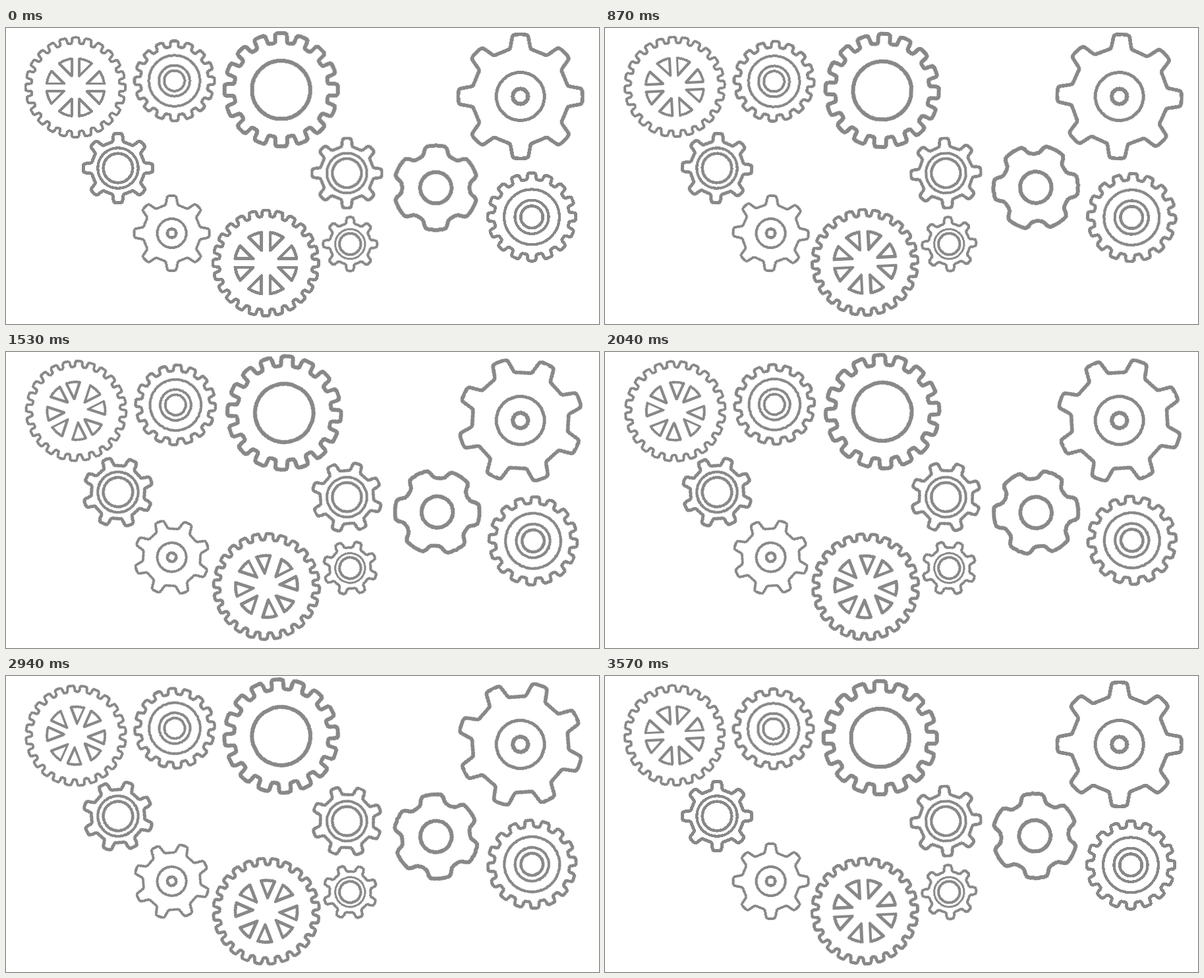
Write an HTML page that moves like this. It is 900 px wide and 450 px high and loops after 3.6 s.

```html
<!DOCTYPE html>
<html lang="en">
<head>
<meta charset="utf-8">
<title>Turning gears</title>
<style>
  html, body { margin: 0; width: 100%; height: 100%; overflow: hidden; background: #fff; }
  svg { display: block; width: 900px; height: 450px; }
  svg * { fill: none; stroke: #888; stroke-linejoin: round; shape-rendering: crispEdges; }
  .cw, .ccw { transform-origin: 0 0; animation: cw 3600ms linear infinite; }
  .ccw { animation-name: ccw; }
  @keyframes cw { to { transform: rotate(360deg); } }
  @keyframes ccw {
    0% { transform: rotate(0deg); }
    99.1667%, 100% { transform: rotate(-360deg); }
  }
</style>
</head>
<body>
<svg id="stage" viewBox="0 0 900 450"></svg>
<script>
const NS = 'http://www.w3.org/2000/svg';
const RAD = Math.PI / 180;

// x, y: pivot; off: centre relative to the pivot
// R, root: tooth tip and valley radius; top, base: half angles of a tooth
// round: corner radius at [tip, valley]; rings: [radius, width]
// wedge: [radius, half gap on the axes, half gap on the diagonals]
const gears = [
  { x: 106.1, y: 90, off: [-.6, .3], dir: 'cw', n: 24, R: 75.9, root: 66.8, top: 3.9, base: 5, round: [3.4, 2.4], w: 3.9, wedge: [44, 5.8, 8.2] },
  { x: 256.5, y: 80.2, off: [-.9, .1], dir: 'ccw', n: 16, R: 60.8, root: 51.8, top: 5.2, base: 6.9, round: [3.4, 2.4], w: 4.4, rings: [[38.8, 4], [23.5, 4], [15.6, 4]] },
  { x: 419.7, y: 92.8, off: [-2.2, 1.2], dir: 'ccw', n: 16, R: 86.4, root: 71.8, top: 5.9, base: 7.1, round: [4.5, 3], w: 6, rings: [[44.3, 6]] },
  { x: 170, y: 213, dir: 'ccw', n: 8, R: 52.9, root: 41, top: 7.2, base: 11.2, round: [4, 2.5], w: 5, rings: [[30.7, 4.3], [22.3, 4.6]] },
  { x: 251.6, y: 312, dir: 'ccw', n: 8, R: 57, root: 44, top: 6.6, base: 12.2, round: [3, 1.5], w: 3.8, rings: [[22, 4], [6.7, 4.5]] },
  { x: 395, y: 357, off: [-.6, .3], dir: 'cw', n: 24, R: 80.4, root: 70.8, top: 3.9, base: 5, round: [3.7, 2.5], w: 4.8, wedge: [47, 6.6, 9] },
  { x: 517.4, y: 220.6, dir: 'cw', n: 8, R: 53.1, root: 41, top: 7.2, base: 11.2, round: [4, 2.5], w: 4.7, rings: [[30.4, 4], [22.1, 4.4]] },
  { x: 522.3, y: 328.4, dir: 'cw', n: 8, R: 40.8, root: 31.7, top: 7.2, base: 11.2, round: [3, 2], w: 4, rings: [[22.6, 3], [16.2, 4]] },
  { x: 653.4, y: 243.3, off: [-1, -.4], dir: 'cw', n: 6, R: 64.5, root: 52, top: 14.5, base: 21.5, round: [5.5, 5], w: 6, rings: [[23.8, 6]] },
  { x: 780.7, y: 104, dir: 'ccw', n: 8, R: 94.5, root: 73.8, top: 7, base: 12.2, round: [4.5, 2], w: 5.6, rings: [[36.5, 5], [11.6, 6]] },
  { x: 799, y: 287, off: [-1, .3], dir: 'ccw', n: 16, R: 67, root: 57.2, top: 5.2, base: 6.9, round: [3.7, 2.5], w: 4.8, rings: [[42, 4.2], [25.6, 4.2], [16.8, 4.6]] }
];

function add(parent, tag, attrs) {
  const el = document.createElementNS(NS, tag);
  for (const k in attrs) el.setAttribute(k, attrs[k]);
  return parent.appendChild(el);
}

// Angle in degrees, clockwise from the top
const polar = (r, deg) => [r * Math.sin(deg * RAD), -r * Math.cos(deg * RAD)];
const str = p => p.map(v => v.toFixed(2)).join(' ');

// Point on the edge p-q, at most half of the edge away from p
function along(p, q, dist) {
  const len = Math.hypot(q[0] - p[0], q[1] - p[1]);
  const k = Math.min(dist / len, .5);
  return [p[0] + (q[0] - p[0]) * k, p[1] + (q[1] - p[1]) * k];
}

// Corners are { p: point, r: rounding }
function roundedPath(corners) {
  const n = corners.length;
  return corners.map(({ p, r }, i) => {
    const a = along(p, corners[(i + n - 1) % n].p, r);
    const b = along(p, corners[(i + 1) % n].p, r);
    return `${i ? 'L' : 'M'}${str(a)}Q${str(p)} ${str(b)}`;
  }).join('') + 'Z';
}

function outline(g) {
  const [tip, valley] = g.round;
  const corners = [];
  for (let i = 0; i < g.n; i++) {
    const a = 360 / g.n * i;
    corners.push({ p: polar(g.root, a - g.base), r: valley });
    for (const t of [-g.top, 0, g.top]) corners.push({ p: polar(g.R, a + t), r: tip });
    corners.push({ p: polar(g.root, a + g.base), r: valley });
  }
  return roundedPath(corners);
}

// Eighth of a disc, set in from its two straight sides
function wedgePath(r, from, to, a) {
  const x = from + to * Math.SQRT2;
  const apex = polar(Math.hypot(x, from), a + Math.atan2(from, x) / RAD);
  const start = polar(r, a + Math.asin(from / r) / RAD);
  const end = polar(r, a + 45 - Math.asin(to / r) / RAD);
  return `M${str(apex)}L${str(start)}A${r} ${r} 0 0 1 ${str(end)}Z`;
}

const stage = document.getElementById('stage');
for (const g of gears) {
  const place = add(stage, 'g', { transform: `translate(${g.x} ${g.y})` });
  const spin = add(place, 'g', { class: g.dir });
  const body = add(spin, 'g', { transform: `translate(${g.off || [0, 0]})` });
  add(body, 'path', { d: outline(g), 'stroke-width': g.w });
  for (const [r, w] of g.rings || []) add(body, 'circle', { r, 'stroke-width': w });
  if (g.wedge) {
    const [r, axis, diag] = g.wedge;
    for (let a = 0; a < 360; a += 90) {
      add(body, 'path', { d: wedgePath(r, axis, diag, a), 'stroke-width': g.w });
      add(body, 'path', { d: wedgePath(r, diag, axis, a + 45), 'stroke-width': g.w });
    }
  }
}
</script>
</body>
</html>
```
